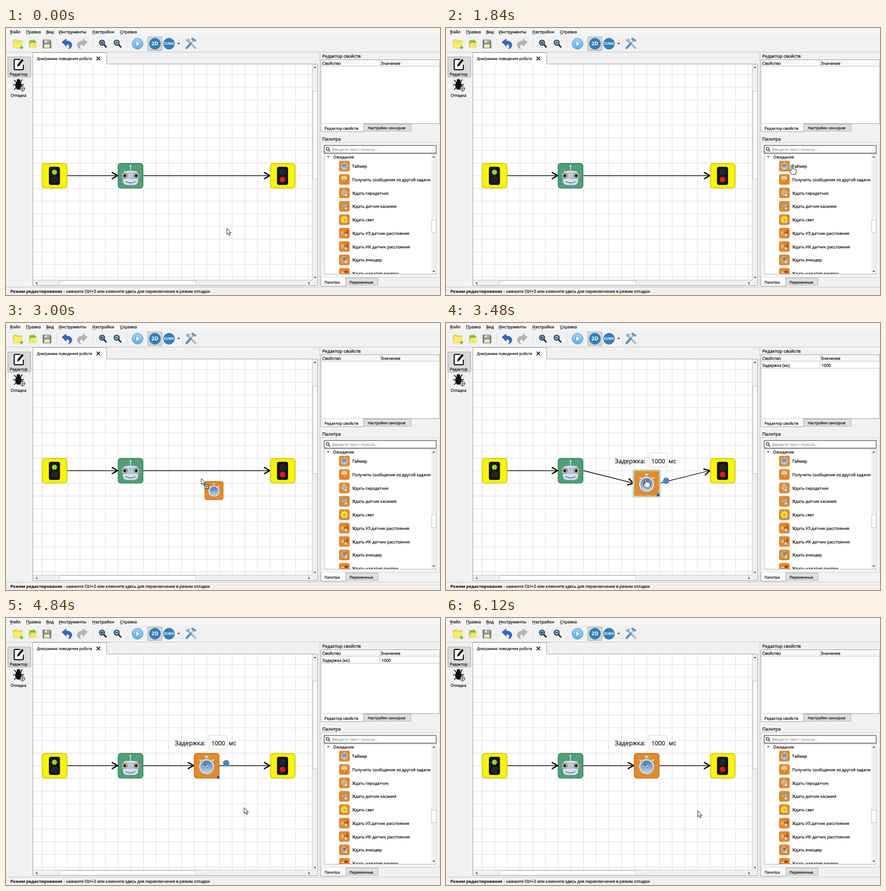
Animation of 800 by 493 pixels, one loop 6.16 s. Source, as an HTML page:

```html
<!DOCTYPE html>
<html lang="ru">
<head>
<meta charset="utf-8">
<title>Редактор диаграмм</title>
<style>
html, body { margin: 0; width: 100%; height: 100%; overflow: hidden; background: #f1f1f2; }
svg { display: block; }
text { font: 7.55px "Open Sans", "Noto Sans", sans-serif; fill: #000; stroke: #000; stroke-width: .2px; text-rendering: geometricPrecision; }
.tab { font-size: 6.9px; }
.mid { font-size: 7.3px; }
.menu { font-size: 7.7px; }
.title { font-size: 8.3px; }
.bold { font-weight: 700; font-size: 7.5px; stroke: none; }
.label { font-size: 11.4px; fill: #111; }
.badge { font-weight: 700; fill: #fff; stroke: none; text-anchor: middle; }
.hint { fill: #777; stroke: none; }
.line { fill: none; stroke: #000; stroke-width: 1.25; }
.head { fill: none; stroke: #000; stroke-width: 2.3; }
.box { fill: #fff; stroke: #a8a8a8; }
.gray { fill: #dfdfdf; stroke: #b4b4b4; }
.rule { stroke: #c8c8c8; fill: none; }
.track { fill: #f0f0f0; }
.thumb { fill: #fdfdfd; stroke: #cacaca; }
.tip { fill: #555; }
</style>
</head>
<body>
<svg width="800" height="493" viewBox="0 0 800 493">
<defs>
  <pattern id="grid" x="66" y="249" width="23.37" height="23.37" patternUnits="userSpaceOnUse">
    <path d="M.5 0V23.4M0 .5H23.4" stroke="#dedede"/>
  </pattern>
  <linearGradient id="dial" x2="0" y2="1"><stop stop-color="#4778b4"/><stop offset="1" stop-color="#bfd3ea"/></linearGradient>
  <linearGradient id="play" x2="0" y2="1"><stop stop-color="#a5d5f5"/><stop offset="1" stop-color="#5fb0e6"/></linearGradient>
  <clipPath id="list"><rect x="587" y="233" width="197" height="221"/></clipPath>

  <symbol id="lamp" overflow="visible">
    <rect x=".8" y=".8" width="45.4" height="45.4" rx="5" fill="#faf50c" stroke="#d6cd0c" stroke-width="1.6"/>
    <rect x="3" y="3" width="41" height="41" rx="4" fill="none" stroke="#eee60b"/>
    <rect x="13" y="7" width="20.5" height="33.5" rx="4" fill="#141414"/>
    <g fill="#242424" stroke="#3a3a3a" stroke-width=".6"><circle cx="23.3" cy="17" r="5.5"/><circle cx="23.3" cy="30.5" r="5.5"/></g>
  </symbol>

  <symbol id="robot" overflow="visible">
    <rect x=".7" y=".7" width="45.6" height="45.6" rx="5" fill="#4f9f79" stroke="#3b8260" stroke-width="1.4"/>
    <path d="M23.5 6V14" stroke="#d9e6ef" stroke-width="1.2"/>
    <circle cx="23.5" cy="5.5" r="1.6" fill="#e6eef5"/>
    <path d="M11 15Q23.500 12 36 15L38 20V33Q37 41 30 41H17Q10 41 9 33V20Z" fill="#d3e0ed" stroke="#5d7b90" stroke-width=".8"/>
    <path d="M7 19H40V28H7Z" fill="#bccbd8" stroke="#70889a" stroke-width=".6"/>
    <g fill="#e6dfa0" stroke="#4a575c" stroke-width=".9"><circle cx="13" cy="23.5" r="4.8"/><circle cx="34" cy="23.5" r="4.8"/></g>
    <g fill="#151b1d"><circle cx="13" cy="23.5" r="2.8"/><circle cx="34" cy="23.5" r="2.8"/></g>
    <path d="M14 34Q23.500 39.500 33 34" fill="none" stroke="#4a6475" stroke-width="1.2"/>
  </symbol>

  <symbol id="timer" overflow="visible">
    <rect x=".7" y=".7" width="45.6" height="45.6" rx="5" fill="#e38a2a" stroke="#c4701d" stroke-width="1.4"/>
    <path d="M23.500 10V6M20.500 6.500H26.500M10.500 12L13 15M36.500 12L34 15" stroke="#dfe3e7" stroke-width="2.4"/>
    <circle cx="23.5" cy="25" r="14.3" fill="#dfe4e9" stroke="#8a9198" stroke-width=".8"/>
    <circle cx="23.5" cy="25" r="11" fill="url(#dial)" stroke="#7890a8" stroke-width=".7"/>
    <circle cx="23.5" cy="25" r="9" fill="none" stroke="#d5e2f1" stroke-width="1" stroke-dasharray="1 3.712"/>
    <path d="M19 20L25 27" stroke="#2b3948" stroke-width="1.2"/>
    <circle cx="23.5" cy="25" r="1.3" fill="#f2f5fa"/>
  </symbol>

  <symbol id="lens" overflow="visible">
    <path d="M3.500 3.500L7.500 8" stroke="#2a3a48" stroke-width="3" stroke-linecap="round"/>
    <circle r="4.6" fill="#8fbbe0" stroke="#30383e" stroke-width="1.8"/>
  </symbol>
  <path id="turn" d="M0 6L8 0V4C16 3 20 9 18 14Q16.500 18 12 18.500C16 14 14 9 8 10.500V14Z"/>
  <path id="up" class="tip" d="M-2.500 1.500L0 -1.500L2.500 1.500Z"/>
</defs>

<rect width="800" height="493" fill="#f1f1f2"/>
<rect width="800" height="13.5" fill="#f5f5f5"/>
<path class="rule" d="M0 44.500H800" stroke="#dadada"/>

<!-- toolbar -->
<g>
  <path d="M13 23L19 21L21 23.500H30V37H14Z" fill="#e9e04a" stroke="#c3b934" stroke-width=".7"/>
  <path d="M14 37L15 26H31L30 37Z" fill="#f3ee72"/>
  <path d="M28.500 33V39M25.500 36H31.500" stroke="#67b52c" stroke-width="2.2"/>
  <path d="M43 23H48L50 25H56V36H43Z" fill="#d8cf3c" stroke="#b5a936" stroke-width=".6"/>
  <path d="M43 36L46 27H58L56 36Z" fill="#f0ea70"/>
  <path d="M44 29Q43 21 50 23V20L55 25L50 29V26Q47 25 44 29Z" fill="#6fba38"/>
  <path d="M68 22H81L83 24V37H68Z" fill="#7d8184" stroke="#62666a" stroke-width=".8"/>
  <rect x="71" y="22.5" width="9" height="5" fill="#d8dce0"/><rect x="70.5" y="30" width="10" height="6.5" fill="#e8edb3"/>
  <path d="M77.500 23V27" stroke="#555" stroke-width="1.5"/>
  <use href="#turn" x="103" y="20" fill="#3268bd" stroke="#27549d" stroke-width=".6"/>
  <use href="#turn" transform="translate(150 20) scale(-1 1)" fill="#b4b6b9" stroke="#95989b" stroke-width=".6"/>
  <use href="#lens" x="177" y="27"/><path d="M174.500 27H179.500M177 24.500V29.500" stroke="#123a63" stroke-width="1.4"/>
  <use href="#lens" x="204" y="27"/><path d="M201.500 27H206.500" stroke="#123a63" stroke-width="1.4"/>
  <path d="M93.500 19V39M160.500 19V39M223.500 19V39M325.500 19V39" stroke="#e2e2e2"/>
  <circle cx="242.5" cy="29" r="10" fill="url(#play)" stroke="#3e93cd"/>
  <path d="M239.500 24L247.500 29L239.500 34Z" fill="#fff" stroke="#3b80b5" stroke-width=".7"/>
  <rect x="261.5" y="16.500" width="26" height="25" rx="1.5" fill="#d7d7d7" stroke="#a6a6a6"/>
  <g fill="#327fba" stroke="#256b9f" stroke-width=".7"><circle cx="274.5" cy="29" r="10.3"/><circle cx="300.5" cy="29" r="10.3"/></g>
  <text class="badge" x="274.5" y="32.300" style="font-size:9.500px">2D</text>
  <text class="badge" x="300.5" y="31.300" style="font-size:6.500px">ZUMK</text>
  <path d="M315.500 27.500H321L318.200 30.500Z" fill="#444"/>
  <path d="M335 23L349 37" stroke="#a4b5c1" stroke-width="3.2" stroke-linecap="round"/>
  <path d="M332 20Q331 27 337 26L339 23Q339 19 335 19V22Z" fill="#9bb2c2"/>
  <path d="M347 21L340 29" stroke="#a9b6bf" stroke-width="2.6"/>
  <path d="M342 19L350 24" stroke="#7595ad" stroke-width="4"/>
  <path d="M340 29L333 37" stroke="#4a90c9" stroke-width="4" stroke-linecap="round"/>
</g>

<!-- mode buttons -->
<rect x="3.5" y="53.500" width="42" height="37" rx="1.5" fill="#dadada" stroke="#a9a9a9"/>
<path d="M26 58H17Q15 58 15 60V75Q15 77 17 77H30Q32 77 32 75V68" fill="#fff" stroke="#111" stroke-width="2"/>
<path d="M20 72L21 67L29.500 56.500L33 59.500L24.500 70Z" fill="#111" stroke="#fff" stroke-width=".7"/>
<path d="M15 96L20 101M30 95L26 101M13 105H19M33 104L28 106M15 114L20 109M29 114L26 109" stroke="#111" stroke-width="1.5"/>
<ellipse cx="23" cy="106" rx="6" ry="8" fill="#111"/><circle cx="23" cy="97.500" r="3.3" fill="#111"/>
<circle cx="30.5" cy="112" r="4" fill="#f1f1f2" stroke="#444"/><path d="M30.500 106.500V117.500M25 112H36" stroke="#444" stroke-width=".9"/>

<!-- diagram area -->
<path class="box" d="M49.500 66.500V45.500H185.500V66.500"/>
<path d="M167 53L173.500 59.500M173.500 53L167 59.500" stroke="#111" stroke-width="1.6"/>
<path class="box" d="M185.500 66.500H574.500V475.500H49.500V66"/>
<rect x="50" y="67" width="514.5" height="399" fill="url(#grid)"/>
<path class="track" d="M565 67H574V475H50V466H565Z"/>
<path class="rule" d="M564.500 67V465.500H50"/>
<rect class="thumb" x="565.5" y="116.500" width="8.5" height="162"/>
<rect class="thumb" x="98.5" y="466.500" width="252" height="8.5"/>
<use href="#up" x="569.5" y="72.500"/>
<use href="#up" transform="translate(569.500 461) rotate(180)"/>
<use href="#up" transform="translate(56 471) rotate(-90)"/>
<use href="#up" transform="translate(559 471) rotate(90)"/>

<!-- properties -->
<path class="rule" d="M578.500 45V476"/>
<rect class="box" x="580.5" y="58.500" width="219" height="118"/>
<rect x="581" y="59" width="218" height="11.5" fill="#f7f7f7"/>
<path class="rule" d="M581 70.500H799M689.500 59V70.500"/>
<rect class="gray" x="659.5" y="177.500" width="87" height="13"/>
<path class="box" d="M580.500 176.500V191.500H659.500V176.500"/>
<g id="props">
  <path class="rule" d="M581 83.500H799M689.500 71V83.500"/>
  <text x="583" y="80.500">Задержка (мс)</text><text x="692" y="80.500">1000</text>
</g>

<!-- palette -->
<rect x="580.5" y="211.500" width="219" height="249" fill="#f4f4f4" stroke="#d2d2d2"/>
<rect x="586.5" y="217" width="206.5" height="14" fill="#fff" stroke="#444" stroke-width="1.1"/>
<circle cx="593" cy="223" r="2.5" fill="none" stroke="#222" stroke-width="1.2"/><path d="M594.800 225L597 228" stroke="#222" stroke-width="1.4"/>
<text class="hint" x="601" y="227">Введите текст поиска...</text>
<rect x="586.5" y="232.500" width="207" height="222" fill="#fff" stroke="#bbb"/>
<rect class="track" x="784" y="233" width="9.5" height="221"/>
<rect class="thumb" x="784.5" y="354.500" width="8.5" height="23"/>
<use href="#up" x="788.5" y="238"/><use href="#up" transform="translate(788.500 449.500) rotate(180)"/>
<path d="M591.500 236.500H596.500L593.900 239.500Z" fill="#555"/>
<g id="palette" clip-path="url(#list)"></g>
<rect class="gray" x="626.5" y="461.500" width="59" height="13.5"/>
<path class="box" d="M580.500 460.500V476.500H626.500V460.500"/>
<path class="rule" d="M0 478.500H800" stroke="#dadada"/>
<g id="words"></g>

<!-- diagram -->
<g id="links"></g>
<use href="#lamp" x="66" y="249.300"/><circle cx="89.3" cy="266.300" r="4.6" fill="#91d62f"/>
<use href="#robot" x="206" y="249.300"/>
<use href="#lamp" x="486.5" y="249.300"/><circle cx="509.8" cy="279.800" r="4.9" fill="#f01414"/>
<g id="node">
  <rect id="halo" x="-2.5" y="-2.500" width="52" height="52" rx="1" fill="#ccd8bd"/>
  <use href="#timer"/>
  <g id="edge" fill="none">
    <rect x=".7" y=".7" width="45.6" height="45.6" stroke="#d9dfb8" stroke-width="1.6"/>
    <rect x=".7" y=".7" width="45.6" height="45.6" stroke="#50664a" stroke-dasharray="1.300 1.500"/>
  </g>
  <text class="label" x="-35" y="-14">Задержка:</text>
  <rect x="28" y="-32.800" width="33.5" height="26" rx="2" fill="#fff" stroke="#999" stroke-width=".8" stroke-dasharray="1.500 1.500"/>
  <text class="label" x="32.3" y="-14" style="font-size:11px">1000</text>
  <text class="label" x="64" y="-14">мс</text>
  <g id="marks">
    <circle cx="59.5" cy="18.700" r="5.6" fill="#437fb2" stroke="#5f91bb" stroke-width=".7"/>
    <circle cx="59.5" cy="18.700" r="2.6" fill="none" stroke="#6fa0c8" stroke-width=".7"/>
  </g>
  <rect id="grip" x="42.5" y="42.500" width="4.8" height="4.8" fill="#1d55cf"/>
</g>
<g id="drag">
  <use href="#timer" transform="translate(6 5) scale(.74)"/>
  <rect x="6.5" y="12" width="6.5" height="6.5" fill="#fff" stroke="#111"/>
  <path d="M9.750 13.500V17M8 15.250H11.500" stroke="#111"/>
</g>
<path id="arrow" d="M0 0V11L2.600 8.800L4.400 13L6.200 12.200L4.400 8.200H7.900Z" fill="#fff" stroke="#111" stroke-width=".9"/>
<path id="hand" d="M0 1.300Q1.200-.6 2.400 1.300V7Q4 5.600 5 7.200Q6.500 6.200 7.300 7.800Q9.300 7.200 9.500 9V13L8 17.500H1.500L-3 11Q-3.300 8.800-1.500 9.500L0 11Z" fill="#fff" stroke="#111" stroke-width=".95"/>
</svg>

<script>
const LOOP = 6160, STEP = 40;
const $ = id => document.getElementById(id);

const words = [
  [7, 10, 'Файл', 'menu'], [37, 10, 'Правка', 'menu'], [74, 10, 'Вид', 'menu'],
  [97, 10, 'Инструменты', 'menu'], [159, 10, 'Настройки', 'menu'], [210, 10, 'Справка', 'menu'],
  [57, 59, 'Диаграмма поведения робота', 'tab'],
  [7, 88, 'Редактор', 'mid'], [8.5, 127, 'Отладка', 'mid'],
  [583, 55, 'Редактор свойств', 'title'], [583, 68, 'Свойство'], [691, 68, 'Значение'],
  [587, 187.5, 'Редактор свойств', 'mid'], [667, 187, 'Настройки сенсоров', 'tab'],
  [583, 207.5, 'Палитра', 'title'], [587, 472, 'Палитра', 'tab'], [633, 471.5, 'Переменные', 'tab'],
  [8, 489, 'Режим редактирования', 'bold'],
  [106, 489, '- нажмите Ctrl+2 или кликните здесь для переключения в режим отладки']
];
const put = ([x, y, s, c = '']) => `<text x="${x}" y="${y}" class="${c}">${s}</text>`;
$('words').innerHTML = words.map(put).join('')
  + '<path d="M7 11.500H12M37 11.500H42M74 11.500H79M97 11.500H103M159 11.500H165M210 11.500H215" stroke="#333" stroke-width=".6"/>';

const badge = '<circle cx="12.500" cy="13.500" r="2.800" fill="#e4d9cc" stroke="#8a7b6c" stroke-width=".7"/>';
const waves = '<path d="M3.500 7Q6 9.500 3.500 12M6 5.500Q9.500 9.500 6 13.500" fill="none" stroke="#f0d6b8" stroke-width="1.200"/>'
  + '<path d="M15 4V12" stroke="#b4301e" stroke-width="1.800"/><path d="M9.500 8.500H14" stroke="#7a3a1d"/>' + badge;
const items = [
  ['Таймер', ''],
  ['Получить сообщение из другой задачи', '<rect x="4.500" y="3.500" width="10" height="6.500" fill="#f1dcae"/><path d="M4.500 3.500L9.500 8L14.500 3.500" fill="none" stroke="#c98a3c"/><path d="M5 15L9.500 11L14 15Z" fill="#f3e04a" stroke="#cb4222"/>'],
  ['Ждать гиродатчик', '<ellipse cx="9.500" cy="9" rx="6" ry="2.800" fill="none" stroke="#e0d5c8"/><ellipse cx="9.500" cy="9" rx="2.800" ry="6" fill="#b9ab9b" stroke="#e0d5c8"/>' + badge],
  ['Ждать датчик касания', '<path d="M3 8.500L14 4.500L16 9L6 12Z" fill="#b7b0a8" stroke="#8d857c" stroke-width=".7"/>' + badge],
  ['Ждать свет', '<circle cx="9.500" cy="9.500" r="5.600" fill="#fae82c" stroke="#fbe01c" stroke-width="3" stroke-dasharray="2.200 2"/><circle cx="9.500" cy="9.500" r="2.300" fill="#e9aa16"/>' + badge],
  ['Ждать УЗ датчик расстояния', waves],
  ['Ждать ИК датчик расстояния', waves],
  ['Ждать энкодер', '<circle cx="9" cy="9" r="5" fill="#a8a39d" stroke="#d8cfc4"/><path d="M9 5V9L14 5" fill="none" stroke="#a8402a" stroke-width="1.300"/>' + badge],
  ['Ждать нажатия кнопки', '<path d="M4 8H10" stroke="#d8cfc4" stroke-width="2"/><path d="M10 7H16" stroke="#b4301e" stroke-width="4"/>']
];
$('palette').innerHTML = put([603, 240.5, 'Ожидание']) + items.map(([name, art], i) => {
  const y = 255 + i * 24.75;
  const icon = art
    ? `<rect x=".5" y=".5" width="18.500" height="18.500" rx="2.500" fill="#e38a2a" stroke="#c4701d" stroke-width=".8"/>${art}`
    : '<use href="#timer" transform="scale(.415)"/>';
  return `<g transform="translate(614 ${y - 9.8})">${icon}</g>` + put([638, y + 3, name]);
}).join('');

const link = (x1, y1, x2, y2) => {
  const turn = Math.atan2(y2 - y1, x2 - x1) * 180 / Math.PI;
  return `<path class="line" d="M${x1} ${y1}L${x2} ${y2}"/>`
    + `<path class="head" d="M-11 -6L0 0L-11 6" transform="translate(${x2} ${y2}) rotate(${turn})"/>`;
};

// time, x, y of the pointer
const path = [
  [640, 407, 370], [840, 436, 355], [1080, 525, 309], [1320, 607, 267], [1560, 636, 253],
  [1840, 636, 253], [1960, 601, 275], [2080, 545, 307], [2200, 480, 322], [2320, 413, 312],
  [2440, 363, 290], [2480, 360, 287], [3080, 360, 287], [3160, 366, 287], [3560, 367, 287],
  [3840, 364, 270], [4400, 364, 270], [4520, 380, 289], [4680, 421, 333], [4800, 439, 350],
  [5080, 439, 350], [5320, 464, 356]
];
const pointer = t => {
  const i = path.findIndex(p => p[0] > t);
  if (i < 1) return (i < 0 ? path[path.length - 1] : path[0]).slice(1);
  const [a, b] = [path[i - 1], path[i]], k = (t - a[0]) / (b[0] - a[0]);
  return [1, 2].map(n => a[n] + (b[n] - a[n]) * k);
};

const DROP = 3160, SNAP = 3760, LEAVE = 4560, CLEAR = 5480;
const show = (id, on) => $(id).setAttribute('display', on ? 'inline' : 'none');
const move = (id, x, y) => $(id).setAttribute('transform', `translate(${x} ${y})`);

function draw(now) {
  const t = Math.floor(now % LOOP / STEP) * STEP;
  const [x, y] = pointer(t);
  const placed = t >= DROP, selected = placed && t < CLEAR, over = placed && t < LEAVE;
  const hand = over || t >= 1400 && t < 1880;
  const top = t < SNAP ? 272.7 : 249.3, mid = top + 23.2, base = 272.5;

  for (const id of ['arrow', 'hand', 'drag']) move(id, x, y);
  move('node', 346.3, top);
  show('arrow', !hand);
  show('hand', hand);
  show('drag', t >= 1880 && !placed);
  show('node', placed);
  show('halo', over);
  show('edge', over);
  show('marks', selected);
  show('grip', selected);
  show('props', selected);
  $('links').innerHTML = link(112.5, base, 206, base) + (placed
    ? link(253, base, 346, mid) + link(393, mid, 486.5, base)
    : link(253, base, 486.5, base));
  requestAnimationFrame(draw);
}
draw(performance.now());
</script>
</body>
</html>
```
